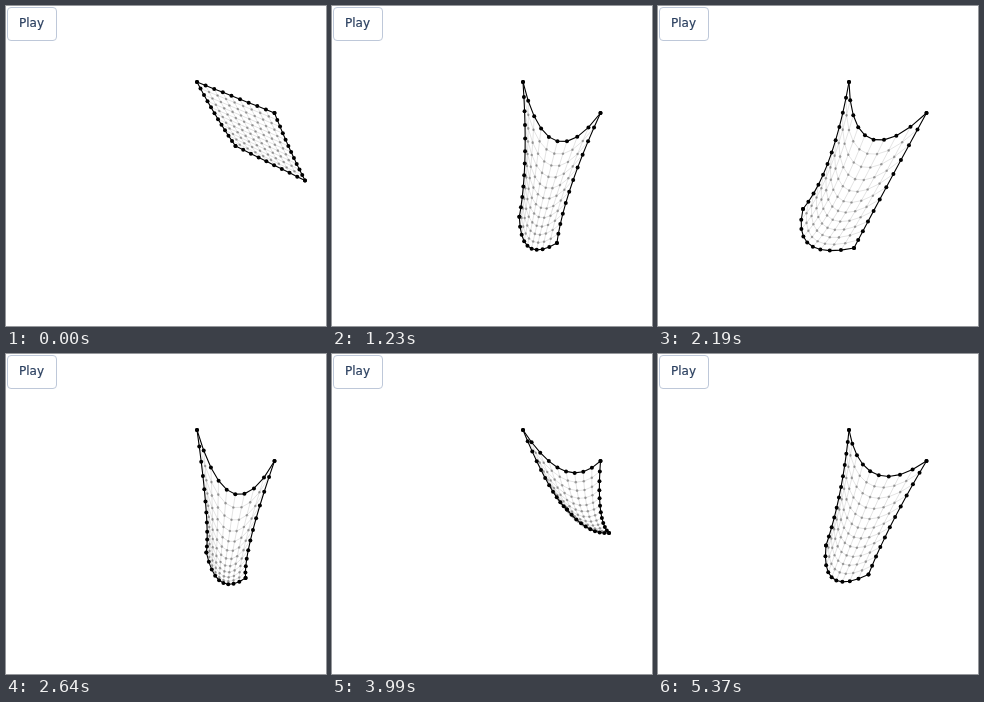
An HTML page with a canvas for the animation above (5.4 s loop, 320 by 320 pixels).

```html
<!DOCTYPE html>
<html lang="en">
<head>
<meta charset="utf-8">
<title>Swinging cloth</title>
<style>
html, body { margin: 0; width: 100%; height: 100%; overflow: hidden; background: #fff; }
canvas { display: block; }
.play {
  position: absolute; left: 1px; top: 1px; width: 50px; height: 34px; box-sizing: border-box;
  border: 1px solid #bec8d9; border-radius: 4px; background: #fff; color: #2a3f5f;
  font: 12px/30px "DejaVu Sans", sans-serif; text-align: center; padding-right: 1px;
  -webkit-text-stroke: .2px;
}
</style>
</head>
<body>
<canvas id="stage" width="320" height="320"></canvas>
<div class="play">Play</div>
<script>
const COLS = 10, ROWS = 12, LOOP = 5400, STEP = 30;
const PIN_L = [191, 76], PIN_R = [268.5, 107];
const ctx = document.getElementById('stage').getContext('2d');

// Swing: time, free left corner, free right corner, sag of the top edge,
// drop of the sides, belly of the bottom edge
const swing = [
  [0, 229.5, 140, 299, 174.5, 0, 2, 0],
  [720, 225.5, 192.5, 250, 208, 41, 17, 9],
  [1140, 193, 212, 229, 237, 39, 8, 15],
  [1740, 160, 192, 204, 222, 27, 5.5, 17],
  [2190, 145, 203, 196, 242, 36, 11.5, 14.5],
  [2600, 196, 200, 237, 227, 42, 14, 15],
  [3150, 248, 168, 261.5, 175.5, 32, 14.5, 10],
  [3570, 233, 149, 293, 171, 17, 9, 4],
  [3990, 235, 155.5, 277, 179, 21.5, 10.7, 6],
  [4700, 196, 204, 232, 236, 38, 10, 16],
  [5130, 166, 196, 203, 236, 31, 6, 18],
  [5370, 168, 191.5, 210.5, 220.5, 25, 4, 17],
];

function swingAt(time) {
  const last = swing.length - 1;
  let k = 0;
  while (k < last - 1 && time >= swing[k + 1][0]) k++;
  const a = swing[k], b = swing[k + 1], h = b[0] - a[0], u = (time - a[0]) / h;
  const before = swing[Math.max(k - 1, 0)], after = swing[Math.min(k + 2, last)];
  return a.map((from, d) => {
    const gap = b[d] - from;
    if (k === 0) return from + gap * u * u; // free fall from rest
    const m0 = (b[d] - before[d]) / (b[0] - before[0]) * h;
    const m1 = (after[d] - from) / (after[0] - a[0]) * h;
    return from + u * (m0 + u * (3 * gap - 2 * m0 - m1 + u * (m0 + m1 - 2 * gap)));
  });
}

const mix = (a, b, s) => a + (b - a) * s;

// Edge from a to b, pulled aside by dx, dy like a hanging rope
function hang(a, b, dx, dy, s) {
  const w = 4.5 * s * (1 - s);
  return [mix(a[0], b[0], s) + w * dx, mix(a[1], b[1], s) + w * dy];
}

// The inside of the cloth is blended from its four edges
function gridAt(time) {
  const [, lx, ly, rx, ry, sag, drop, belly] = swingAt(time);
  const bl = [lx, ly], br = [rx, ry];
  const lean = Math.min(0, 0.25 * ((lx + rx) / 2 - 237));
  const grid = [];
  for (let j = 0; j < ROWS; j++) {
    const v = j / (ROWS - 1);
    const left = hang(PIN_L, bl, 0.09 * sag, drop, v);
    const right = hang(PIN_R, br, -0.18 * sag, drop, v);
    for (let i = 0; i < COLS; i++) {
      const u = i / (COLS - 1);
      const top = hang(PIN_L, PIN_R, lean, sag * (0.9 + 0.2 * u), u);
      const bottom = hang(bl, br, lean, belly, u);
      grid.push([0, 1].map(d =>
        mix(top[d], bottom[d], v) + mix(left[d], right[d], u)
        - mix(mix(PIN_L[d], PIN_R[d], u), mix(bl[d], br[d], u), v)));
    }
  }
  return grid;
}

function stroke(points, color, width) {
  ctx.beginPath();
  points.forEach(p => ctx.lineTo(p[0], p[1]));
  ctx.strokeStyle = color;
  ctx.lineWidth = width;
  ctx.stroke();
}

function dots(points, color, radius) {
  ctx.fillStyle = color;
  for (const [x, y] of points) {
    ctx.beginPath();
    ctx.arc(x, y, radius, 0, 2 * Math.PI);
    ctx.fill();
  }
}

function draw(time) {
  const grid = gridAt(time);
  const row = j => grid.slice(j * COLS, (j + 1) * COLS);
  const col = i => grid.filter((p, n) => n % COLS === i);
  ctx.clearRect(0, 0, 320, 320);
  for (let j = 1; j < ROWS - 1; j++) stroke(row(j), 'rgba(0,0,0,.14)', 0.8);
  for (let i = 1; i < COLS - 1; i++) stroke(col(i), 'rgba(0,0,0,.14)', 0.8);
  for (let j = 1; j < ROWS - 1; j++) dots(row(j).slice(1, -1), 'rgba(0,0,0,.32)', 1.3);
  for (const edge of [row(0), row(ROWS - 1), col(0), col(COLS - 1)]) {
    stroke(edge, '#000', 1.1);
    dots(edge, '#000', 2);
  }
}

const start = performance.now();
function tick() {
  const time = (performance.now() - start) % LOOP;
  draw(Math.floor(time / STEP) * STEP);
  requestAnimationFrame(tick);
}
tick();
</script>
</body>
</html>
```
